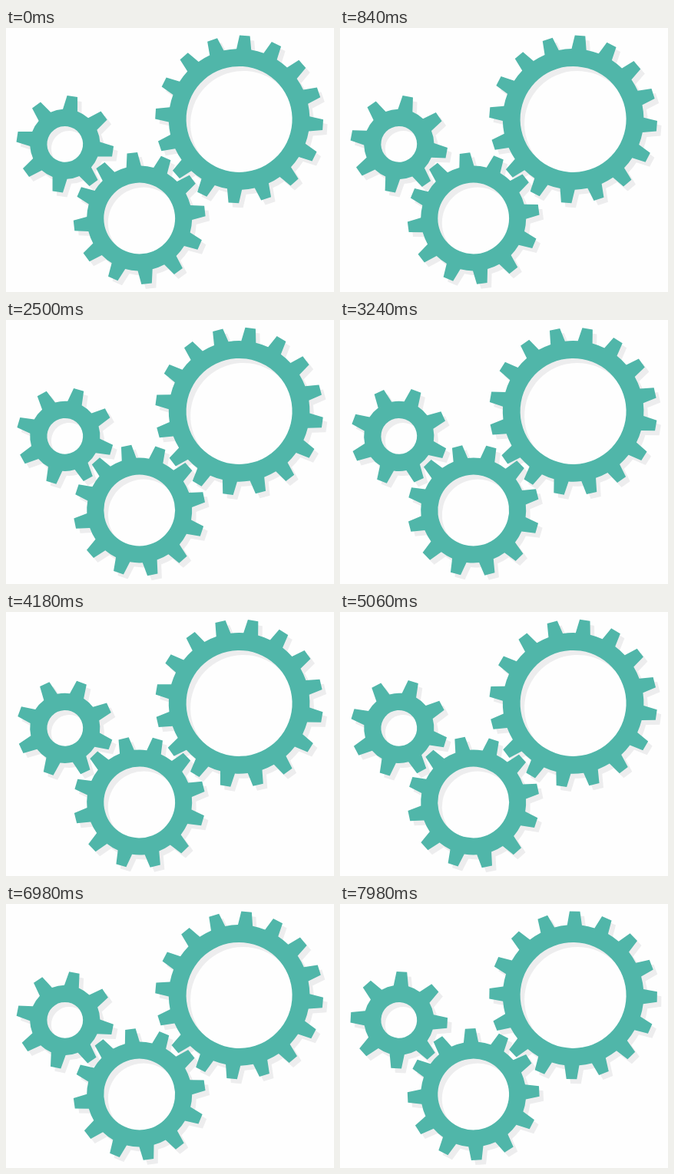
Recreate the animation shown at these times as an HTML page. Size 427 px wide and 344 px high, loop 8 s.

```html
<!DOCTYPE html>
<html lang="en">
<head>
<meta charset="utf-8">
<title>Turning gears</title>
<style>
  html, body { margin: 0; width: 100%; height: 100%; overflow: hidden; background: #fefefe; }
  svg { display: block; width: 100%; height: 100%; }
</style>
</head>
<body>
<svg viewBox="0 0 427 344">
  <g id="shadows" fill="#ededee" transform="translate(5.5 6)"></g>
  <g id="wheels" fill="#50b6a9"></g>
</svg>
<script>
const LOOP = 8000;
const TOOTH_STEP = 0.3;      // degrees per step, times 8 / teeth ratio below
const TIP_HALF = 6.8, BASE_HALF = 9.6;

// start: angle of one tooth at time zero; turn: degrees per step
const gears = [
  { x: 76.8,  y: 151.3, teeth: 8,  hole: 23.4, body: 45.6, tip: 63,    start: -81.3, turn: -8 * TOOTH_STEP },
  { x: 173.7, y: 248,   teeth: 12, hole: 46.4, body: 68.5, tip: 85.7,  start: -96.3, turn: 1.6 },
  { x: 303.6, y: 118.9, teeth: 16, hole: 69,   body: 91.8, tip: 109.2, start: -86.2, turn: -1.2 }
];

function gearPath({ teeth, hole, body, tip }) {
  const base = Math.sqrt(body ** 2 - BASE_HALF ** 2);
  const corners = [[base, -BASE_HALF], [tip, -TIP_HALF], [tip, TIP_HALF], [base, BASE_HALF]];
  let d = "";
  for (let i = 0; i < teeth; i++) {
    const a = i * 2 * Math.PI / teeth, c = Math.cos(a), s = Math.sin(a);
    corners.forEach(([u, v], k) => {
      const lead = k ? "L" : i ? `A${body} ${body} 0 0 1 ` : "M";
      d += `${lead}${(u * c - v * s).toFixed(2)} ${(u * s + v * c).toFixed(2)}`;
    });
  }
  d += `A${body} ${body} 0 0 1 ${base.toFixed(2)} ${-BASE_HALF}Z`;
  return d + `M${hole} 0A${hole} ${hole} 0 1 0 ${-hole} 0A${hole} ${hole} 0 1 0 ${hole} 0Z`;
}

for (const gear of gears) {
  gear.paths = ["shadows", "wheels"].map(id => {
    const path = document.createElementNS("http://www.w3.org/2000/svg", "path");
    path.setAttribute("d", gearPath(gear));
    path.setAttribute("fill-rule", "evenodd");
    return document.getElementById(id).appendChild(path);
  });
}

// The motion ticks in groups of three steps, held for 20, 20 and 100 ms.
function stepAt(time) {
  const t = time + 20, rest = t % 140;
  return Math.floor(t / 140) * 3 + (rest < 20 ? 0 : rest < 40 ? 1 : 2) - 1;
}

function draw() {
  const step = stepAt(performance.now() % LOOP);
  for (const { x, y, start, turn, paths } of gears) {
    const pose = `translate(${x} ${y}) rotate(${start + turn * step})`;
    paths.forEach(path => path.setAttribute("transform", pose));
  }
  requestAnimationFrame(draw);
}
draw();
</script>
</body>
</html>
```
